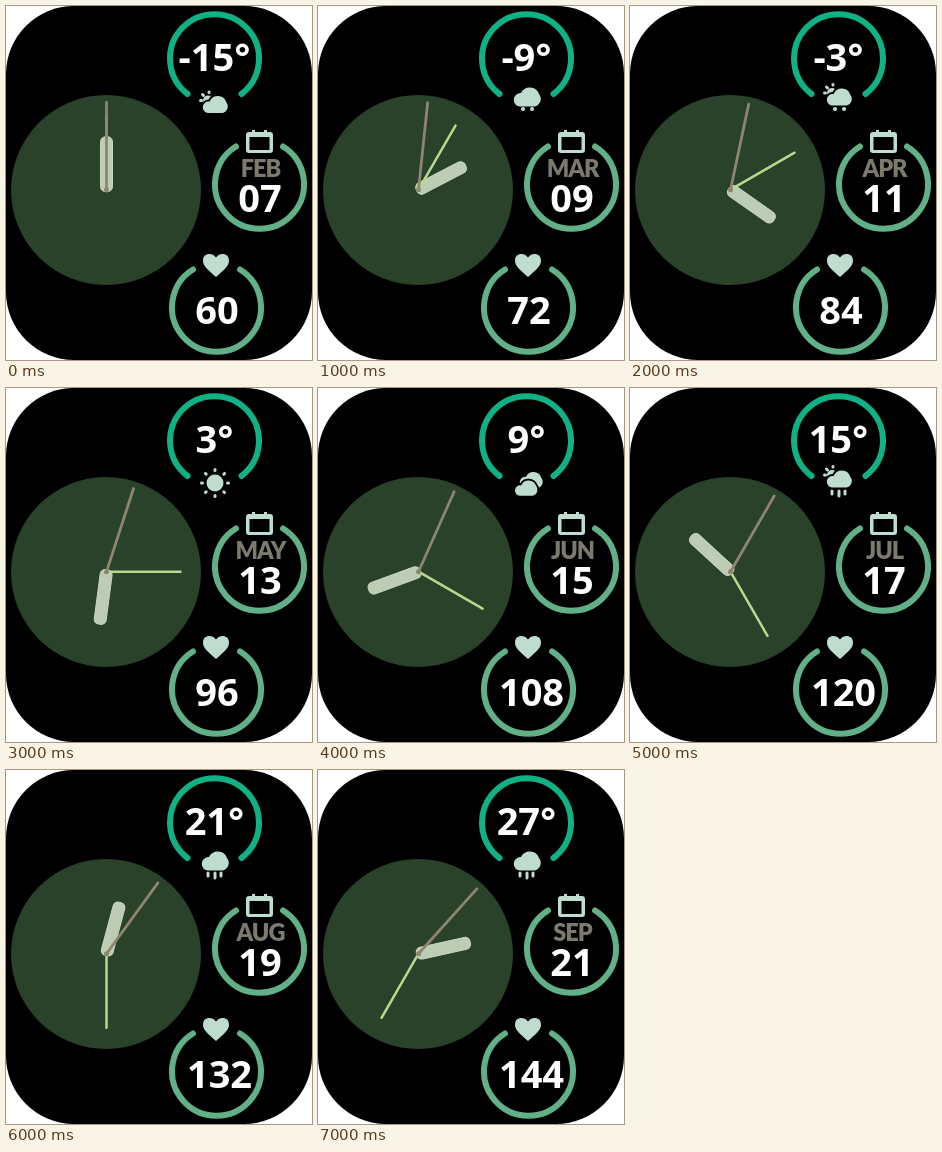
An HTML page that plays this animation: 306x354 px, repeating every 8000 ms.

```html
<!DOCTYPE html>
<html lang="en">
<head>
<meta charset="utf-8">
<style>
  html, body { margin: 0; width: 100%; height: 100%; overflow: hidden; background: #fff; }
  svg { display: block; width: 306px; height: 354px; }
  text { font: 700 38px "Open Sans", "Noto Sans", sans-serif; fill: #fff; text-anchor: middle; }
  #month { font: 900 23.500px Lato, sans-serif; letter-spacing: -1px; fill: #7c7a6c; }
  .ring { fill: none; stroke: #62b088; stroke-width: 6; stroke-linecap: round; }
  .icon { fill: #bfddcf; stroke: #bfddcf; stroke-width: 0; stroke-linecap: round; }
  .lines { fill: none; stroke-width: 3; }
  .cut { stroke: #000; stroke-width: 2; }
</style>
</head>
<body>
<svg viewBox="0 0 306 354">
  <defs>
    <path id="cloud" d="M-7 9.500a6.700 6.700 0 0 1 1-13.400A9.800 9.800 0 0 1 12-3A7.800 7.800 0 0 1 8 9.500z"/>
    <path id="rays" class="lines" d="M-14.500-4h1M-12.500-10l1 1M-6-12.500v.5"/>
    <circle id="halfsun" cx="-7" cy="-4" r="5"/>
    <path id="rain" class="lines" d="M-7 12v3M0 12v5M6 12v3"/>
    <path id="snow" class="lines" style="stroke-width:4" d="M-4 12h.1M5 12h.1"/>
  </defs>
  <rect width="306" height="354" rx="68"/>
  <circle cx="100" cy="184" r="95" fill="#2a412a"/>
  <g transform="translate(100.500 183.700)" stroke-linecap="round">
    <rect id="hour" x="-6" y="-53" width="12" height="55" rx="5" fill="#bdccb4" stroke="#c6d5bd"/>
    <path id="minute" d="M0 0V-74" stroke="#b7d88e" stroke-width="2.500"/>
    <path id="second" d="M0 0V-87.500" stroke="#8c866f" stroke-width="2.800"/>
    <circle r="2.500" fill="#8c866f"/>
  </g>

  <path class="ring" style="stroke:#10b184" d="M181.500 88a44.500 44.500 0 1 1 54 0"/>
  <path class="ring" d="M230 140.500a44.500 44.500 0 1 0 47 0"/>
  <path class="ring" d="M187 263.500a44.500 44.500 0 1 0 47 0"/>

  <g class="icon" id="weather"></g>
  <path class="icon" fill-rule="evenodd" d="M243 126h3v-2h3v2h9v-2h3v2h3q3 0 3 3v15q0 3-3 3h-21q-3 0-3-3v-15q0-3 3-3zM243.500 131v13h20v-13z"/>
  <path class="icon" d="M210 271C201 263 197 260 197 254.500C197 247 206 246 210 251.500C214 246 223 247 223 254.500C223 260 219 263 210 271z"/>

  <text id="temp" x="208.500" y="65"></text>
  <text id="month" x="254.500" y="171"></text>
  <text id="day" x="254" y="206"></text>
  <text id="pulse" y="318"></text>
</svg>
<script>
const $ = id => document.getElementById(id);
const use = (id, y = 0, extra = '') => `<use href="#${id}" y="${y}" ${extra}/>`;
const cutCloud = y => use('cloud', y, 'class="cut"');
const sunny = y => use('halfsun', y) + use('rays', y) + cutCloud(y);
const sun = '<circle r="8.500"/>' + Array.from({ length: 8 }, (_, i) =>
  `<path class="lines" d="M0-12.500v-1" transform="rotate(${i * 45})"/>`).join('');
const clouds = `<g transform="translate(4 -3) scale(.85)">${use('cloud')}</g>
  <g transform="translate(-1 5) scale(.9)">${cutCloud(0)}</g>`;
const rainy = use('cloud', -4) + use('rain', -4);
const weather = [
  sunny(3.5),
  use('cloud', -4) + use('snow', -4),
  sunny(-4) + use('snow', -4),
  sun,
  clouds,
  sunny(-4) + use('rain', -4),
  rainy,
  rainy
];
const months = 'FEB MAR APR MAY JUN JUL AUG SEP'.split(' ');
const turn = (id, degrees) => $(id).setAttribute('transform', `rotate(${degrees})`);
$('weather').setAttribute('transform', 'translate(209 95)');

// Each step advances the clock by 2 h 5 min 1 s.
function show(step) {
  turn('hour', step * 62.5);
  turn('minute', step * 30);
  turn('second', step * 6);
  $('weather').innerHTML = weather[step];
  $('temp').textContent = step * 6 - 15 + '°';
  $('month').textContent = months[step];
  $('day').textContent = String(7 + step * 2).padStart(2, '0');
  const pulse = 60 + step * 12;
  $('pulse').textContent = pulse;
  $('pulse').setAttribute('x', pulse > 99 ? 213.5 : 211);
}

let shown = -1;
function tick() {
  const step = Math.floor(performance.now() / 1000) % 8;
  if (step !== shown) show(shown = step);
  requestAnimationFrame(tick);
}
tick();
</script>
</body>
</html>
```
